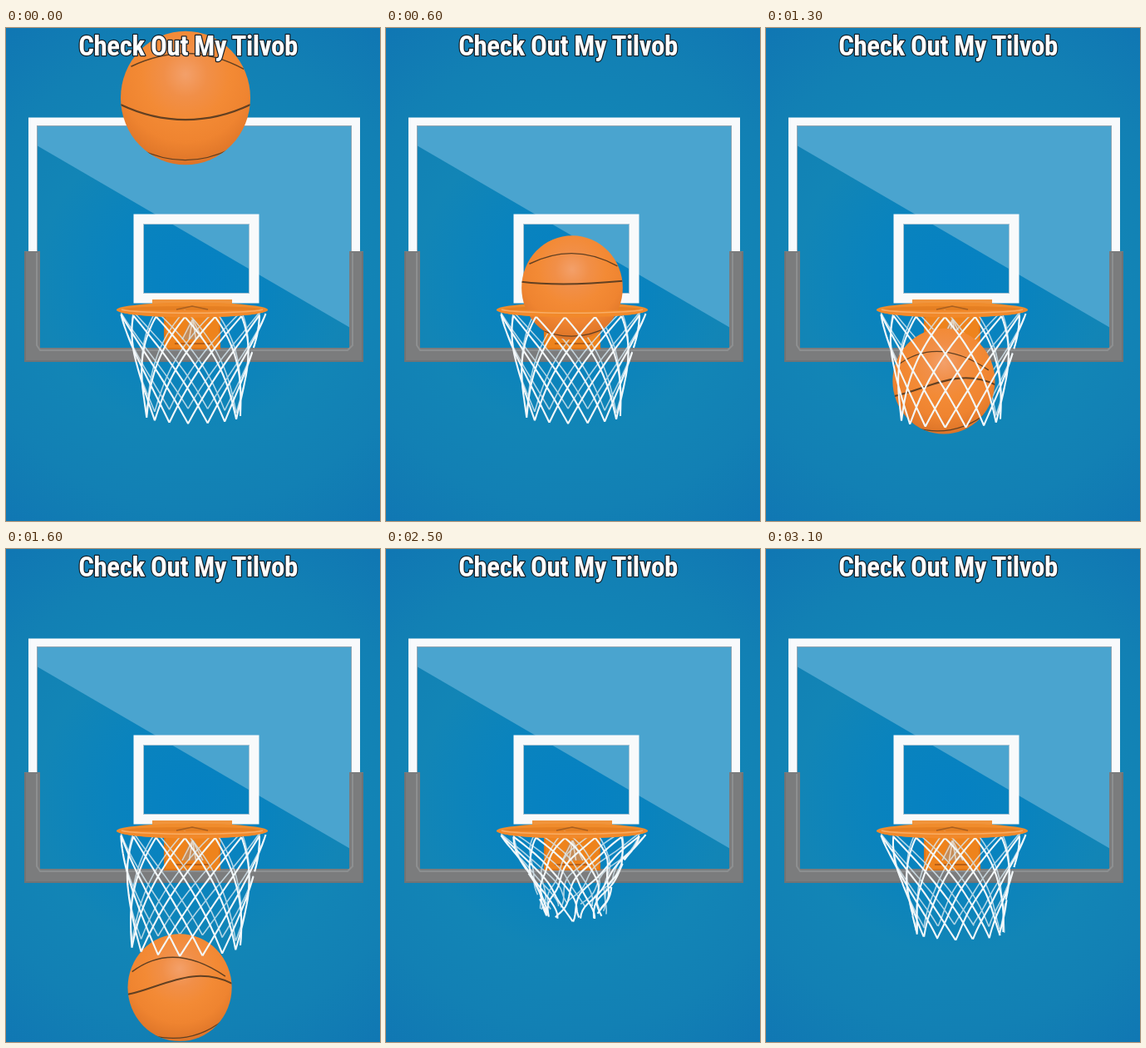
An HTML page with a canvas for the animation above (3200 ms loop, 450 px wide and 592 px high).

```html
<!DOCTYPE html>
<html lang="en">
<head>
<meta charset="utf-8">
<title>Basketball shot</title>
<style>
  html, body { margin: 0; width: 100%; height: 100%; overflow: hidden; background: #1280b6; }
  canvas, svg { position: absolute; left: 0; top: 0; display: block; }
  text {
    font-family: "Roboto Condensed", "Open Sans", sans-serif;
    font-weight: 900; font-stretch: 62.5%; letter-spacing: -.4px;
    fill: #fff; stroke: #17222b; stroke-width: 2.5px; stroke-linejoin: round;
    paint-order: stroke; text-anchor: middle;
  }
</style>
</head>
<body>
<canvas width="450" height="592"></canvas>
<svg width="450" height="592"><text x="219" y="33" font-size="34">Check Out My Tilvob</text></svg>
<script>
const ctx = document.querySelector('canvas').getContext('2d');
const LOOP = 3200, STEP = 100, TAU = Math.PI * 2;
const { sin, cos, exp, PI } = Math;
const mix = (a, b, k) => a + (b - a) * k;

function smooth(from, to, t) {
  const k = Math.min(1, Math.max(0, (t - from) / (to - from)));
  return k * k * (3 - 2 * k);
}

// The ball drops, slows down in the net and speeds up again below it.
function ballAt(t) {
  const roll = smooth(.5, 1.1, t);
  return {
    x: 216 + 8 * sin(TAU * t / 2.4),
    y: 84 + 652 * t - 585 * t ** 2 + 219 * t ** 3,
    r: 59.5 + 18.5 * exp(-5 * t) + 1.2 * t * t,
    roll,
    ends: .1 - .23 * sin(PI * t / 1.2) ** 2,
    bend: .3 - .6 * smooth(.3, 1, t)
  };
}

// The ball stretches the net, which then recoils and settles while swinging.
function netAt(t) {
  const swell = smooth(1.1, 1.6, t) * (1 - smooth(1.6, 2, t));
  const recoil = smooth(1.65, 2.1, t) * (1 - smooth(2.45, 3.35, t));
  const swing = 8 * sin((t - 2.5) * 2.6) * smooth(1.65, 2.1, t);
  return {
    x: 225 - 9 * swell + swing,
    y: 466 + 10 * swell - 30 * recoil,
    r: 57 + 9 * swell - 21 * recoil,
    depth: 9 + 4 * swell,
    sway: 4 * recoil
  };
}

function radial(x, y, r, ...colors) {
  const g = ctx.createRadialGradient(x, y, 0, x, y, r);
  colors.forEach((color, i) => g.addColorStop(i / (colors.length - 1), color));
  return g;
}

function rect(x, y, w, h, color) {
  ctx.fillStyle = color;
  ctx.fillRect(x, y, w, h);
}

function frame(x, y, w, h, color, width) {
  ctx.strokeStyle = color;
  ctx.lineWidth = width;
  ctx.strokeRect(x, y, w, h);
}

function ellipse(x, y, rx, ry, color) {
  ctx.beginPath();
  ctx.ellipse(x, y, rx, ry, 0, 0, TAU);
  ctx.fillStyle = color;
  ctx.fill();
}

function strokePath(path, color, width) {
  ctx.strokeStyle = color;
  ctx.lineWidth = width;
  ctx.stroke(new Path2D(path));
}

function fillPath(path, color) {
  ctx.fillStyle = color;
  ctx.fill(new Path2D(path));
}

function drawBoard() {
  rect(0, 0, 450, 592, radial(225, 300, 370, '#0581c3', '#0983be', '#1285b6', '#1280b4', '#1077b3'));
  fillPath('M37 117H416V361L37 141Z', '#4aa4cf');
  frame(32, 112.5, 389, 280, '#f8fafc', 10);
  frame(37.5, 117.5, 378, 270, '#8fa5b2', 1);
  frame(159.5, 229.5, 139, 95, '#f8fafb', 12);
  frame(165.5, 235.5, 127, 83, '#a9c3d2', 1);
  fillPath('M22 268H41V384H413V268H430V401H22Z', '#7b7c7d');
  strokePath('M37 270V381L41 387H411L417 381V270', '#8d8f90', 2);
  strokePath('M23 269V400H429V269', '#707375', 2);
}

function drawBracket() {
  rect(190, 344, 68, 42, '#ee831c');
  frame(191, 345, 66, 40, '#dd7618', 2);
  fillPath('M222 350H227L238 374H211Z', '#c58c58');
  for (let x = 212; x <= 237; x += 8.3) strokePath(`M224.5 350L${x} 374`, '#e6d5c2', 1.5);
  strokePath('M203 379H246', '#b95f16', 2);
}

function drawRimBack() {
  rect(176, 326, 96, 10, '#f0943c');
  ellipse(224, 338.5, 91, 9, '#f08c2c');
  ellipse(224, 337.5, 82, 3.5, '#e57f22');
  strokePath('M205 338L224 334L243 338', '#a85f20', 1.5);
}

function drawRimFront() {
  fillPath('M133 338A91 9.5 0 0 0 315 338H310A86 1 0 0 1 138 338Z', '#f2892a');
  strokePath('M139 338A86 5 0 0 0 309 338', '#f8ad65', 1.5);
}

// Two families of spiral cords cross into diamonds and meet at the hem.
function drawNet(hem, front) {
  const cords = 15, parts = 24, twist = 3 * TAU / cords;
  ctx.beginPath();
  for (let i = 0; i < cords; i++) {
    for (const dir of [-1, 1]) {
      let drawing = false;
      for (let n = 0; n <= parts; n++) {
        const u = n / parts;
        const angle = i * TAU / cords + dir * twist * u;
        const visible = (sin(angle) >= 0) === front;
        const radius = mix(88, hem.r, 1 - (1 - u) ** 1.6);
        const wave = hem.sway * u * sin(u * 11 + i * 2.3 + dir);
        const x = mix(224.5, hem.x, u) + radius * cos(angle) + wave;
        const y = mix(343, hem.y, u) + mix(4, hem.depth, u) * sin(angle) + wave * .6;
        if (visible && drawing) ctx.lineTo(x, y);
        else if (visible) ctx.moveTo(x, y);
        drawing = visible;
      }
    }
  }
  ctx.strokeStyle = front ? '#f3f8fa' : '#d8e9f2cc';
  ctx.lineWidth = front ? 2.1 : 1.6;
  ctx.stroke();
}

function drawBall({ x, y, r, roll, ends, bend }) {
  ctx.save();
  ctx.translate(x, y);
  ctx.scale(r, r * 1.03);
  ellipse(0, 0, 1, 1, radial(0, -.35, 1.35, '#f3a06a', '#f18f48', '#f38a35', '#ef8430', '#dd7428'));
  ctx.clip();
  ctx.rotate(-.2 * roll);
  const seam = (path, width) => strokePath(path, '#624022', width / r);
  const mid = ends + bend;
  seam(`M-1 ${ends}C-.35 ${mid + .3 * roll} .35 ${mid} 1 ${ends + .2 * roll}`, 2);
  seam(`M-.84 -.47Q.05 -.88 .9 ${-.43 + .4 * roll}`, 1.4);
  seam('M-.72 .76Q0 1.1 .7 .76', 1.2);
  ctx.restore();
}

function draw(t) {
  const net = netAt(t);
  drawBoard();
  drawBracket();
  drawRimBack();
  drawNet(net, false);
  drawBall(ballAt(t));
  drawNet(net, true);
  drawRimFront();
}

// Keep the caption within its line, whichever condensed face is available.
const caption = document.querySelector('text');
const fitted = 34 * 264 / caption.getComputedTextLength();
caption.setAttribute('font-size', Math.max(26, Math.min(34, fitted)));

function tick() {
  draw(Math.floor(performance.now() % LOOP / STEP) * STEP / 1000);
  requestAnimationFrame(tick);
}
tick();
</script>
</body>
</html>
```
